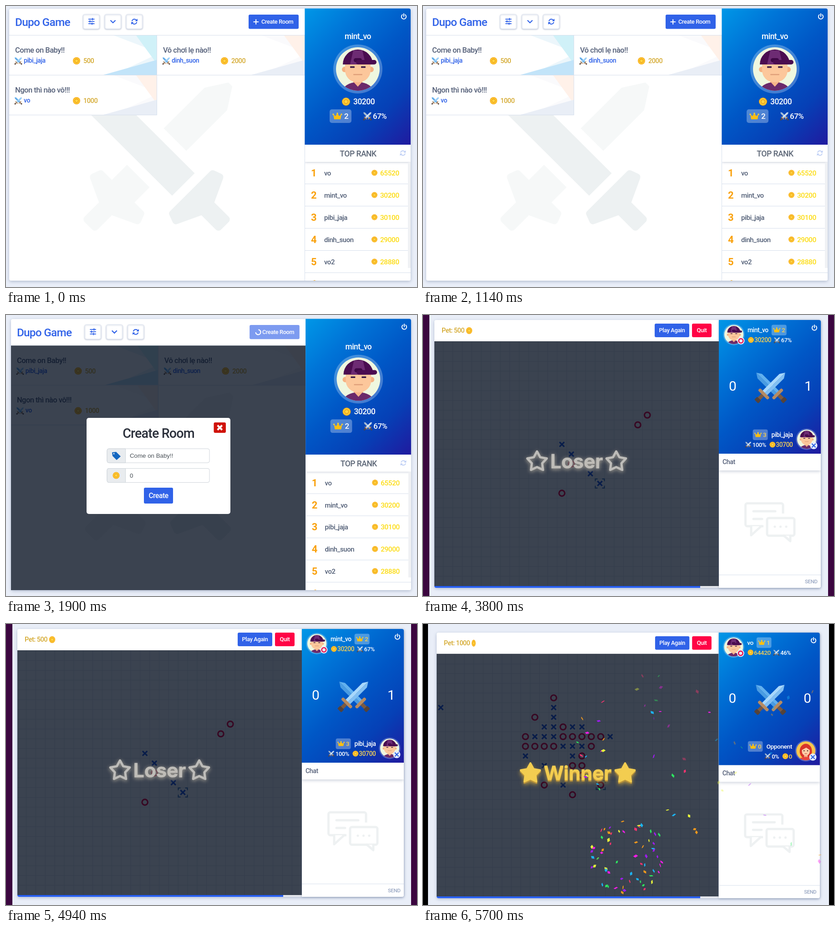
An HTML page with a canvas that plays this animation: 903x620 px, repeating every 7.6 s.

```html
<!DOCTYPE html>
<html lang="en">
<head>
<meta charset="utf-8">
<title>Board game lobby</title>
<style>
html, body { margin: 0; width: 100%; height: 100%; overflow: hidden; background: #e9eef8; }
canvas { display: block; width: 903px; height: 620px; }
</style>
</head>
<body>
<canvas id="stage"></canvas>
<script>
const W = 903, H = 620, HOLD = 1900, TAU = Math.PI * 2;
const canvas = document.getElementById('stage');
const c = canvas.getContext('2d');
const dpr = window.devicePixelRatio || 1;
canvas.width = W * dpr;
canvas.height = H * dpr;

const BLUE = '#3062e8', GOLD = '#d4a92f', SLATE = '#56617a', LINE = '#d6dfec', PAGE = '#e9eef8';
const SHADE = 'rgba(0,11,28,.77)';
const UI = 'Roboto, sans-serif';

function rect(x, y, w, h, fill, r = 0, stroke) {
  c.beginPath();
  c.roundRect(x, y, w, h, r);
  if (fill) { c.fillStyle = fill; c.fill(); }
  if (stroke) { c.strokeStyle = stroke; c.lineWidth = 1; c.stroke(); }
}

function oval(x, y, rx, ry, fill, from = 0, to = TAU) {
  c.beginPath();
  c.ellipse(x, y, rx, ry, 0, from, to);
  c.fillStyle = fill;
  c.fill();
}

const disc = (x, y, r, fill) => oval(x, y, r, r, fill);

function arc(x, y, r, color, width, from = 0, to = TAU) {
  c.beginPath();
  c.arc(x, y, r, from, to);
  c.strokeStyle = color;
  c.lineWidth = width;
  c.stroke();
}

function trace(points) {
  c.beginPath();
  for (let i = 0; i < points.length; i += 2) c.lineTo(points[i], points[i + 1]);
}

function poly(fill, ...points) {
  trace(points);
  c.closePath();
  c.fillStyle = fill;
  c.fill();
}

function line(color, width, ...points) {
  trace(points);
  c.strokeStyle = color;
  c.lineWidth = width;
  c.stroke();
}

/* Draws a string and returns its width. */
function text(s, x, y, size, color, align = 'left', weight = 500, family = UI) {
  c.font = `${weight} ${size}px ${family}`;
  c.letterSpacing = family === UI ? `${-size * 0.03}px` : '0px';
  c.textAlign = align;
  c.fillStyle = color;
  c.fillText(s, x, y);
  return c.measureText(s).width;
}

function at(x, y, scale, draw) {
  c.save();
  c.translate(x, y);
  c.scale(scale, scale);
  draw();
  c.restore();
}

function shadowed(color, blur, dy, draw) {
  c.save();
  c.shadowColor = color;
  c.shadowBlur = blur * dpr;
  c.shadowOffsetY = dy * dpr;
  draw();
  c.restore();
}

function rounded(draw) {
  c.save();
  c.lineJoin = c.lineCap = 'round';
  draw();
  c.restore();
}

/* Icons */

function coin(x, y, r, squash = 1) {
  at(x, y, r, () => {
    c.scale(squash, 1);
    disc(0, 0, 1, '#f7a916');
    disc(0, 0, 0.82, '#ffd43f');
    arc(0, 0, 0.5, '#f0a21a', 0.22);
  });
}

const STEEL = ['#62b0ee', '#4a9ce2', '#a9d8fb', '#82bff2'];
const SILVER = ['#b9cbdc', '#a9bccf', '#e4eef7', '#c6d6e5'];

function swords(x, y, size, tones = STEEL) {
  [-1, 1].forEach((side, i) => at(x, y, size / 65, () => {
    c.scale(side, 1);
    c.rotate(Math.PI / 4);
    poly(tones[2 * i], -7, 19, -7, -34, 0, -45, 0, 19);
    poly(tones[2 * i + 1], 7, 19, 7, -34, 0, -45, 0, 19);
    rect(-15, 18, 30, 7, '#b68b62', 3);
    rect(-4, 25, 8, 13, '#7a5a43');
    rect(-6, 36, 12, 9, '#54433b', 2);
  }));
}

function crown(x, y, size) {
  at(x, y, size / 20, () => {
    poly('#fcbf12', -9, -4, -4, 0, 0, -7, 4, 0, 9, -4, 7, 7, -7, 7);
    for (const side of [-1, 0, 1]) disc(side * 9, side ? -4 : -6, 1.7, '#ffd02e');
  });
}

function refresh(x, y, r, color) {
  for (const turn of [0, Math.PI]) {
    at(x, y, r / 6, () => {
      c.rotate(turn);
      arc(0, 0, 5, color, 1.9, Math.PI * 1.06, Math.PI * 1.8);
      poly(color, 6.4, -6, 6.4, -1, 1.4, -1);
    });
  }
}

function power(x, y) {
  rounded(() => {
    arc(x, y + 0.5, 5.2, '#fff', 1.9, -0.95, Math.PI + 0.95);
    line('#fff', 1.9, x, y - 6, x, y);
  });
}

function cross(x, y, r, color, width) {
  line(color, width, x - r, y - r, x + r, y + r);
  line(color, width, x + r, y - r, x - r, y + r);
}

function capFace() {
  rect(-10, 22, 20, 20, '#f0a579');
  oval(0, 50, 34, 21, '#6b2a6b');
  poly('#f7b58a', -10, 28, 10, 28, 0, 39);
  for (const side of [-1, 1]) disc(side * 29, 1, 6, '#f6b283');
  rect(-28, -16, 56, 45, '#fcc79b', [0, 0, 26, 26]);
  for (const side of [-1, 1]) rect(side * 12 - 5, -6, 10, 3.5, '#3a1c46', 1);
  rect(-10, 11, 20, 2.5, '#e0a07a', 1);
  oval(0, -10, 33, 33, '#4b0d50', Math.PI, TAU);
  poly('#6d2b73', -10, -41, 10, -41, 17, -10, -17, -10);
  rect(-9, -24, 18, 9, '#3f0846', 5);
  rect(-4, -20, 45, 10, '#4b0d50', 5);
}

function redFace() {
  oval(0, 2, 31, 38, '#d9352b');
  rect(-9, 15, 18, 25, '#f2ab82');
  oval(0, 51, 38, 20, '#e8453d');
  rect(-20, -18, 40, 42, '#fdcfa8', [6, 6, 20, 20]);
  poly('#d9352b', -23, -23, 23, -23, 22, -3, 2, -16, -22, -3);
  for (const side of [-1, 1]) disc(side * 9, 0, 3, '#4c2922');
  rect(-6, 13, 12, 3, '#c94d46', 1);
}

function avatar(x, y, r, girl) {
  disc(x, y, r * 1.125, 'rgba(255,255,255,.26)');
  at(x, y, r / 48, () => {
    disc(0, 0, 48, girl ? '#f9c54d' : '#eff7df');
    c.clip();
    (girl ? redFace : capFace)();
  });
}

function star(x, y, r) {
  c.beginPath();
  for (let i = 0; i < 10; i++) {
    const a = i * TAU / 10 - TAU / 4, d = i % 2 ? r * 0.53 : r;
    c.lineTo(x + d * Math.cos(a), y + d * Math.sin(a));
  }
  c.closePath();
}

/* Shared pieces */

function panel(x, y, w, h) {
  shadowed('rgba(70,90,130,.35)', 7, 2, () => rect(x, y, w, h, '#fff', 4));
}

function sideGradient(x, y, w, h) {
  const reach = (w + h) / 4, mx = x + w / 2, my = y + h / 2;
  const g = c.createLinearGradient(mx - reach, my - reach, mx + reach, my + reach);
  ['#0097e7', '#0074d7', '#0057c6', '#0640b6', '#201a9f'].forEach((tone, i) => g.addColorStop(i / 4, tone));
  rect(x, y, w, h, g, [0, 4, 0, 0]);
}

function button(x, y, w, h, fill, label, size = 12.8) {
  rect(x, y, w, h, fill, 3);
  text(label, x + w / 2, y + h / 2 + size * 0.35, size, '#fff', 'center');
}

/* Lobby */

function room(x, y, title, owner, bet, tones) {
  const r = x + 324, b = y + 87;
  rect(x, y, 324, 87, '#fff');
  poly(tones[0], r - 94, y, r, y, r, y + 36);
  poly(tones[0], r - 96, b, r, y + 42, r, b);
  poly(tones[1], r - 45, y, r, y, r, y + 62);
  poly(tones[2], r - 117, b, r, y + 54, r, b);
  line(LINE, 1, x, b + 0.5, r + 0.5, b + 0.5, r + 0.5, y);
  text(title, x + 13, y + 38, 16.5, SLATE);
  swords(x + 20, y + 56, 16);
  text(owner, x + 32, y + 60, 14, BLUE);
  coin(x + 148, y + 56, 8);
  text(bet, x + 163, y + 61, 14.5, GOLD);
}

/* One half of the crossed swords; the front blade runs through, the back one is cut. */
function silhouette(side, color, front) {
  at(331, 335, 1, () => {
    c.scale(side, 1);
    c.rotate(Math.PI / 4);
    poly(color, -35, -57, -35, -184, -6, -229, 6, -229, 35, -184, 35, -57);
    if (front) rect(-35, -58, 70, 141, color);
    else rect(-35, 57, 70, 55, color);
    rounded(() => {
      poly(color, -62, 112, 62, 112, 68, 128, 12, 154, 12, 204, -12, 204, -12, 154, -68, 128);
      c.strokeStyle = color;
      c.lineWidth = 16;
      c.stroke();
    });
  });
}

function toolbar(busy) {
  text('Dupo Game', 20, 44, 24.4, BLUE);
  for (const x of [169.5, 217, 264]) {
    shadowed('rgba(60,80,130,.3)', 3, 1, () => rect(x, 18.5, 36, 32, '#fff', 4, '#dce3ef'));
  }
  [190, 184.5, 189].forEach((knob, i) => {
    const y = 29 + 5 * i;
    line(BLUE, 1.8, 181, y, 194.5, y);
    line(BLUE, 1.8, knob, y - 2.6, knob, y + 2.6);
  });
  line(BLUE, 2.2, 229.5, 31.5, 235, 37, 240.5, 31.5);
  refresh(282, 34.5, 6.5, BLUE);

  rect(533, 19, 110, 31.5, busy ? '#7d9bf0' : BLUE, 3);
  if (busy) {
    arc(552, 35, 5.5, '#fff', 2.2, -1.5, 3.1);
  } else {
    line('#fff', 2, 543.5, 35, 555, 35);
    line('#fff', 2, 549.2, 29.3, 549.2, 40.7);
  }
  text('Create Room', 561, 39, 12.8, '#fff');
  line(LINE, 1, 7, 64.5, 657, 64.5);
}

function lobby(busy) {
  const cool = ['#ecf6fb', '#d0f1f8', '#c2e4f9'], warm = ['#fafafc', '#fff1e9', '#e9eef6'];
  panel(7, 6, 882, 600);
  silhouette(1, '#f6f8f8', false);
  silhouette(-1, '#edf1f2', true);
  toolbar(busy);
  room(7, 65, 'Come on Baby!!', 'pibi_jaja', '500', cool);
  room(332, 65, 'Vô chơi lẹ nào!!', 'dinh_suon', '2000', warm);
  room(7, 153, 'Ngon thì nào vô!!!', 'vo', '1000', warm);
  line(LINE, 1, 656.5, 65, 656.5, 606);

  sideGradient(656.4, 5.6, 232.6, 300.4);
  power(874, 23);
  text('mint_vo', 773, 73, 17.5, '#fff', 'center');
  avatar(773, 139, 48);
  coin(747, 211, 9);
  text('30200', 763, 217, 17.5, '#fff');
  rect(711, 228, 48, 30, 'rgba(255,255,255,.3)', 5);
  crown(728, 243, 20);
  text('2', 743, 249, 17, '#fff');
  swords(794, 243, 18, SILVER);
  text('67%', 806, 249, 17, '#fff');
  ranking();
}

function ranking() {
  const rows = [['vo', 65520], ['mint_vo', 30200], ['pibi_jaja', 30100], ['dinh_suon', 29000], ['vo2', 28880]];
  c.save();
  rect(657, 306, 232, 300, '#fff', [0, 0, 4, 0]);
  c.clip();
  rows.forEach(([name, score], i) => {
    const y = 374 + i * 49;
    text(i + 1, 670, y + 2, 22, '#f9a10d', 'left', 700);
    text(name, 699, y, 15, '#515e76');
    coin(809.5, y - 6, 6.5);
    text(score, 822, y, 15.5, '#fcdc13');
    line(LINE, 1, 657, y + 18.5, 889, y + 18.5);
  });
  text(6, 670, 621, 22, '#f9a10d', 'left', 700);
  c.beginPath();
  c.rect(657, 306, 232, 300);
  c.clip();
  shadowed('rgba(60,80,120,.3)', 5, 1, () => rect(657, 306, 232, 38, '#fff'));
  rect(883, 345, 6, 233, '#f0f1f4');
  c.restore();
  text('TOP RANK', 773.5, 332, 17.6, '#5e6878', 'center');
  refresh(872, 324.5, 6, '#bccdf5');
}

function inputRow(y, value) {
  rect(222, y, 225, 31, '#fff', 4, '#ced4da');
  rect(222, y, 40.5, 31, '#e9ecef', [4, 0, 0, 4], '#ced4da');
  text(value, 272, y + 20, 13.3, '#495057', 'left', 400, '"Liberation Sans", Arial, sans-serif');
}

function createDialog() {
  rect(177, 227, 316, 212, '#fff', 5);
  text('Create Room', 335, 271, 28.7, '#2c313c', 'center');
  rect(456.5, 237, 26.5, 23, '#d0130a', 3);
  cross(469.7, 248.5, 5, '#fff', 4);
  inputRow(295, 'Come on Baby!!');
  inputRow(338.5, '0');
  poly('#1467c0', 233, 303, 242, 302, 252, 312, 243, 320, 234, 311);
  disc(237, 306, 1.5, '#e9ecef');
  coin(242, 354, 7.5);
  button(303, 381, 64, 35, BLUE, 'Create', 15.6);
}

/* Match */

const colX = i => 34.1 + 20.85 * i;
const rowY = i => 156.2 + 21.55 * i;

/* Marks are written as row:column:run, one run per group. */
function board(marks, [lastCol, lastRow]) {
  c.save();
  rect(25, 58, 625, 540, '#fff');
  c.clip();
  for (let i = 0; i < 31; i++) line('#e2e6ec', 1, colX(i) - 10.4, 58, colX(i) - 10.4, 598);
  for (let i = -5; i < 22; i++) line('#e2e6ec', 1, 25, rowY(i) - 10.8, 650, rowY(i) - 10.8);
  for (const group of marks.split(' ')) {
    const [row, col, run] = group.split(':');
    [...run].forEach((mark, i) => {
      const x = colX(+col + i), y = rowY(+row);
      if (mark === 'O') arc(x, y, 6.3, '#f0003c', 3.2);
      if (mark === 'X') cross(x, y, 5.2, '#2457e0', 3.2);
    });
  }
  const x = colX(lastCol), y = rowY(lastRow);
  for (const sx of [-1, 1]) for (const sy of [-1, 1]) {
    line('#3a70b8', 2, x + sx * 10, y + sy * 5, x + sx * 10, y + sy * 10, x + sx * 5, y + sy * 10);
  }
  rect(25, 58, 625, 540, SHADE);
  c.restore();
}

function rankBadge(x, y, rank) {
  rect(x, y, 33, 23.5, 'rgba(255,255,255,.3)', 4);
  crown(x + 11.5, y + 11.5, 15);
  text(rank, x + 22.5, y + 16.5, 13.5, '#f8cf52');
}

function markBadge(x, y, mark) {
  disc(x, y, 8, '#e6edfb');
  if (mark === 'O') arc(x, y, 4.8, '#e8104c', 2.6);
  else cross(x, y, 4.2, '#2b62e2', 2.2);
}

function topPlayer(p) {
  avatar(683, 43, 21);
  markBadge(698.5, 57, 'O');
  const nameEnd = 713 + text(p.name, 713, 38, 13.8, '#fff');
  rankBadge(nameEnd + 7, 21.5, p.rank);
  coin(720.5, 55, 6.5);
  const goldEnd = 728 + text(p.gold, 728, 60, 13.8, '#f6cf55');
  swords(goldEnd + 12.5, 55.5, 13, SILVER);
  text(p.rate, goldEnd + 21.5, 60, 13, '#fff');
}

function bottomPlayer(p) {
  const right = 812.5;
  const nameStart = right - text(p.name, right, 269, 13.8, '#fff', 'right');
  rankBadge(nameStart - 41, 252.5, p.rank);
  const coinX = right - text(p.gold, right, 291, 13.8, '#f6cf55', 'right') - 7.5;
  coin(coinX, 286, 6.5);
  const rateStart = coinX - 14 - text(p.rate, coinX - 14, 291, 13, '#fff', 'right');
  swords(rateStart - 9, 286, 13, SILVER);
  avatar(843, 274, 21, p.girl);
  markBadge(858.5, 288, 'X');
}

function bubble(x, y, w, h, ...tail) {
  c.lineWidth = 5;
  c.strokeStyle = '#eef1f2';
  c.beginPath();
  c.roundRect(x, y, w, h, 4);
  c.stroke();
  poly('#fff', ...tail);
  line('#eef1f2', 5, ...tail);
}

function chatIcon() {
  rounded(() => {
    bubble(708.5, 415.5, 82.5, 50.5, 721, 466, 721, 486, 743, 466);
    line('#eef1f2', 5, 726, 433, 774, 433);
    line('#eef1f2', 5, 726, 450, 745, 450);
    rect(748, 438, 70, 50, '#fff');
    bubble(756, 448, 60, 39, 793, 487, 807, 499, 807, 487);
    for (let i = 0; i < 3; i++) disc(773 + 12.5 * i, 467, 2.6, '#eef1f2');
  });
}

function match(m) {
  panel(25, 11, 849, 591);
  const betEnd = 41 + text(`Pet: ${m.bet}`, 41, 39, 14.4, GOLD);
  coin(betEnd + 4 + 7 * m.spin, 34.5, 7.5, m.spin);
  button(509, 19, 76, 30, BLUE, 'Play Again');
  button(591, 19, 43, 30, '#ff0345', 'Quit');
  board(m.marks, m.last);
  rect(25, 598, 625, 4, '#e4e6ec', [0, 0, 0, 4]);
  rect(25, 598, 584, 4, '#2860f4', [0, 0, 0, 4]);

  shadowed('rgba(70,90,130,.4)', 5, 1, () => rect(650, 11, 224, 591, '#fff', [0, 4, 4, 0]));
  sideGradient(650, 11, 224, 295);
  power(860, 28);
  topPlayer(m.top);
  text(m.top.score, 680, 167, 30, '#fff', 'center', 400);
  swords(764, 159, 65);
  text(m.bottom.score, 846, 167, 30, '#fff', 'center', 400);
  bottomPlayer(m.bottom);

  c.save();
  c.beginPath();
  c.rect(650, 306, 224, 60);
  c.clip();
  shadowed('rgba(60,80,120,.35)', 8, 1, () => rect(650, 306, 224, 37, '#fff'));
  c.restore();
  text('Chat', 658, 329, 14.2, SLATE);
  chatIcon();
  line(LINE, 1, 650, 573.5, 874, 573.5);
  text('SEND', 839, 592, 11.4, '#98a6c2');
}

function banner(word, x, y, spread, tone, filled) {
  rounded(() => {
    c.strokeStyle = tone;
    for (const side of [-1, 1]) {
      star(x + side * spread, y - 14.5, 22.5);
      c.fillStyle = tone;
      c.lineWidth = filled ? 4 : 5;
      if (filled) c.fill();
      c.stroke();
    }
    text(word, x, y, 42.5, tone, 'center', 600, 'Inter, sans-serif');
    c.lineWidth = 1.2;
    c.strokeText(word, x, y);
  });
}

/* Confetti */

function confetti() {
  const tones = ['#e6f23c', '#f41ce8', '#f59a1c', '#1cb4f4', '#2ce860', '#a01cf2', '#ff3470'];
  let seed = 41;
  const rnd = () => (seed = seed * 16807 % 2147483647) / 2147483647;
  const scatter = (count, alpha, place) => {
    for (let i = 0; i < count; i++) {
      const [x, y] = place(rnd(), rnd());
      const w = 3 + rnd() * 2, h = 0.8 + rnd() * 2;
      c.save();
      c.globalAlpha = alpha;
      c.translate(x, y);
      c.rotate(rnd() * Math.PI);
      poly(tones[i % tones.length], -w, -h, w * 0.5, -h, w, h, -w * 0.5, h);
      c.restore();
    }
  };
  scatter(26, 0.4, (u, v) => [470 + 410 * u, 85 + 150 * v + 330 * u * v]);
  scatter(14, 1, (u, v) => [380 + 60 * (u - 0.7), 170 + 225 * v]);
  scatter(13, 1, (u, v) => [500 + 150 * u, 185 + 285 * v]);
  scatter(62, 1, (u, v) => {
    const d = Math.pow(v, 0.35);
    return [446 + 82 * d * Math.cos(u * TAU), 514 + 82 * d * Math.sin(u * TAU)];
  });
}

/* Scenes */

const lost = {
  bet: 500, spin: 0.9, last: [17, 10],
  marks: '3:22:O 4:21:O 6:13:X 7:14:X 8:14:O 9:16:X 10:17:X 11:13:O',
  top: { name: 'mint_vo', rank: 2, gold: '30200', rate: '67%', score: 0 },
  bottom: { name: 'pibi_jaja', rank: 3, gold: '30700', rate: '100%', score: 1 }
};
const won = {
  bet: 1000, spin: 0.6, last: [17, 9],
  marks: '0:12:O 1:0:X 1:12:X 2:10:O-X 3:11:XXOXX 4:9:OXXXOOOOOX 5:9:OOOOXXXO 6:9:X----XO 7:11:X--OO 8:15:O 9:11:O-X---O 10:14:O',
  top: { name: 'vo', rank: 1, gold: '64420', rate: '46%', score: 0 },
  bottom: { name: 'Opponent', rank: 0, gold: '0', rate: '0%', score: 0, girl: true }
};

function backdrop(edge, left, right) {
  rect(0, 0, W, H, edge);
  rect(left, 0, right - left, H, PAGE);
}

const scenes = [
  () => {
    backdrop(PAGE, 0, W);
    lobby(false);
  },
  () => {
    backdrop(PAGE, 0, W);
    at(4, 3, 0.9966, () => lobby(true));
    rect(11, 67.5, 647, 539.5, SHADE);
    createDialog();
  },
  () => {
    backdrop('#3b063f', 14, 890);
    match(lost);
    shadowed('rgba(205,195,175,.75)', 9, 2, () => banner('Loser', 337.5, 338, 87, '#bdbcb9', false));
  },
  () => {
    backdrop('#000', 11, 892);
    at(5.2, 8.1, 0.9916, () => match(won));
    shadowed('rgba(240,190,60,.6)', 10, 2, () => banner('Winner', 340, 347, 104, '#b8923c', true));
    banner('Winner', 340, 344, 104, '#f3cd50', true);
    confetti();
  }
];

let shown = -1;
const start = performance.now();
function tick() {
  const i = Math.floor((performance.now() - start) / HOLD) % scenes.length;
  if (i !== shown) {
    shown = i;
    c.setTransform(dpr, 0, 0, dpr, 0, 0);
    scenes[i]();
  }
  requestAnimationFrame(tick);
}
tick();
</script>
</body>
</html>
```
